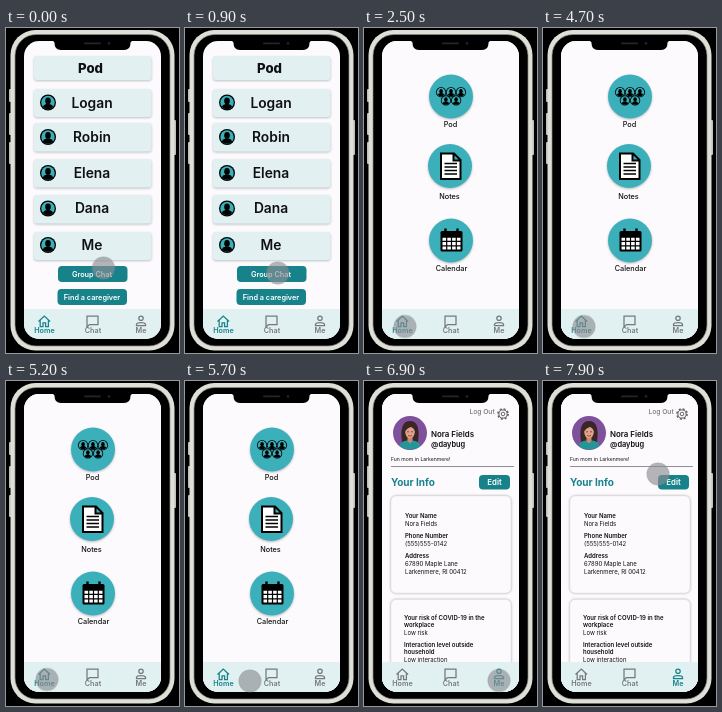
These frames come from a looping animation (173x325 px, 8000 ms). An HTML page:

```html
<!DOCTYPE html>
<html lang="en">
<head>
<meta charset="utf-8">
<title>Care pod app</title>
<style>
  :root { --teal: #17828a; --aqua: #3bb0bb; --pale: #e2f0f2; --paper: #fcfafd; --grey: #75797c; }
  html, body { margin: 0; width: 100%; height: 100%; overflow: hidden; background: #000; }
  svg { display: block; width: 100vw; height: 100vh; }
  text { font-family: Inter, "Open Sans", sans-serif; font-weight: 600; fill: #101012; }
  .mid { text-anchor: middle; }
  .names { font-size: 13.8px; }
  .btn { fill: var(--teal); }
  .on-btn { fill: #fff; font-size: 7.3px; }
  .label { font-size: 7.3px; font-weight: 500; }
  .cards { fill: var(--pale); filter: drop-shadow(0 1.3px .8px #8d9da199); }
  .discs { fill: var(--aqua); filter: drop-shadow(0 1px 1px #5556); }
  .panels { fill: var(--paper); stroke: #e4e2e8; stroke-width: .6; filter: drop-shadow(0 .6px 1.3px #5557); }
  .info { font-size: 6px; }
  .info .v { font-weight: 400; }
  .nav { color: var(--grey); }
  .nav text { font-size: 7.2px; fill: currentColor; }
  .nav path, .nav circle { fill: none; stroke: currentColor; stroke-width: 1.25; }
  .tab-home { animation: leave 8s infinite; }
  .tab-me { animation: enter 8s infinite; }
  #home { animation: show-home 8s infinite; }
  #profile { animation: show-profile 8s infinite; }
  #touch { animation: touch 8s infinite; }

  /* Motion advances in 100 ms ticks. */
  @keyframes show-home {
    0% { opacity: 0; }
    26.25% { opacity: 0; animation-timing-function: steps(2, start); }
    28.75% { opacity: .7; animation-timing-function: steps(3, start); }
    32.5%, 100% { opacity: 1; }
  }
  @keyframes show-profile {
    0% { opacity: 0; }
    82.5% { opacity: 0; animation-timing-function: steps(2, start); }
    85% { opacity: .75; animation-timing-function: steps(2, start); }
    87.5%, 100% { opacity: 1; }
  }
  @keyframes leave {
    0% { color: var(--teal); }
    82.5% { color: var(--teal); animation-timing-function: steps(4, start); }
    87.5%, 100% { color: var(--grey); }
  }
  @keyframes enter {
    0% { color: var(--grey); }
    82.5% { color: var(--grey); animation-timing-function: steps(4, start); }
    87.5%, 100% { color: var(--teal); }
  }
  @keyframes touch {
    0% { transform: translate(97.5px, 240px); }
    11.25% { transform: translate(97.5px, 240px); animation-timing-function: steps(2, start); }
    13.75% { transform: translate(88px, 250px); animation-timing-function: steps(4, start); }
    18.75% { transform: translate(47px, 292px); animation-timing-function: steps(2, start); }
    21.25% { transform: translate(41px, 298.5px); }
    70% { transform: translate(41px, 298.5px); animation-timing-function: steps(2, start); }
    72.5% { transform: translate(65px, 300px); }
    73.75% { transform: translate(65px, 300px); animation-timing-function: steps(6, start); }
    81.25% { transform: translate(135px, 299.5px); }
    93.75% { transform: translate(135px, 299.5px); animation-timing-function: steps(2, start); }
    96.25% { transform: translate(111px, 190px); animation-timing-function: step-start; }
    97.5% { transform: translate(103px, 128px); animation-timing-function: steps(2, start); }
    100% { transform: translate(115px, 93px); }
  }
</style>
</head>
<body>
<svg viewBox="0 0 173 325" preserveAspectRatio="none">
  <defs>
    <clipPath id="glass"><rect x="18" y="13" width="137" height="298" rx="15"/></clipPath>
    <clipPath id="face"><circle r="16.5"/></clipPath>
    <g id="person">
      <circle r="8"/>
      <circle r="6.7" fill="#3bb0bb"/>
      <ellipse cy="-1.6" rx="2.8" ry="3.4"/>
      <path d="M-5.2 4.6Q-4.6 2.2-1.5 1.5H1.5Q4.6 2.2 5.2 4.6Q0 9-5.2 4.6Z"/>
    </g>
  </defs>

  <!-- Phone body -->
  <g fill="#bfc0ba">
    <rect x="3" y="61" width="3" height="13" rx="1"/>
    <rect x="3" y="85" width="3" height="22" rx="1"/>
    <rect x="3" y="114" width="3" height="22" rx="1"/>
    <rect x="167" y="92" width="3" height="35" rx="1"/>
  </g>
  <rect x="4.5" y="2" width="164" height="320.5" rx="25" fill="#dedfd7"/>
  <rect x="9" y="6.5" width="155" height="311.5" rx="21" stroke="#8d8e89" stroke-width=".7"/>

  <g clip-path="url(#glass)">
    <g id="pod">
      <rect x="18" y="13" width="137" height="298" fill="#fcfafd"/>
      <g class="cards">
        <rect x="28" y="28" width="117.5" height="24" rx="3"/>
        <rect x="28" y="61" width="117.5" height="28" rx="3"/>
        <rect x="28" y="95" width="117.5" height="28.5" rx="3"/>
        <rect x="28" y="131" width="117.5" height="28.5" rx="3"/>
        <rect x="28" y="167" width="117.5" height="28.5" rx="3"/>
        <rect x="28" y="204" width="117.5" height="28" rx="3"/>
      </g>
      <use href="#person" x="42" y="74.5"/>
      <use href="#person" x="42" y="109"/>
      <use href="#person" x="42" y="145"/>
      <use href="#person" x="42" y="180.5"/>
      <use href="#person" x="42" y="217"/>
      <g class="mid names">
        <text x="84.5" y="45" style="font-size:13.2px;font-weight:800">Pod</text>
        <text x="86" y="79.5">Logan</text>
        <text x="86" y="113.5">Robin</text>
        <text x="86" y="149.5">Elena</text>
        <text x="86" y="185">Dana</text>
        <text x="86" y="222">Me</text>
      </g>
      <rect class="btn" x="52" y="238" width="69.5" height="16" rx="4"/>
      <rect class="btn" x="51.5" y="261" width="69.5" height="16" rx="4"/>
      <text class="mid on-btn" x="86" y="248.8">Group Chat</text>
      <text class="mid on-btn" x="86" y="271.8">Find a caregiver</text>
    </g>

    <g id="home">
      <rect x="18" y="13" width="137" height="298" fill="#fcfafd"/>
      <g class="discs">
        <circle cx="87" cy="68.5" r="22"/>
        <circle cx="86" cy="138" r="22"/>
        <circle cx="87" cy="212.5" r="22"/>
      </g>
      <g transform="translate(87 68) scale(.64)">
        <use href="#person" x="-15.5" y="-6"/>
        <use href="#person" y="-6"/>
        <use href="#person" x="15.5" y="-6"/>
        <use href="#person" x="-8" y="7"/>
        <use href="#person" x="8" y="7"/>
      </g>
      <path d="M77 125.5H90L96.5 132V151H77Z M89.5 126V132.5H96" fill="#fff" stroke="#000" stroke-width="2"/>
      <path d="M80.5 135.5H93M80.5 139H93M80.5 142.5H93M80.5 146H93" stroke="#000" stroke-width="1.6"/>
      <rect x="76.5" y="203" width="22" height="20.5" rx="1.5"/>
      <path d="M81.5 200.5V206M93.5 200.5V206" stroke="#000" stroke-width="2.4"/>
      <path d="M78.5 211.2H96.5M78.5 215.6H96.5M78.5 220H96.5" stroke="#fff" stroke-width="3.1" stroke-dasharray="3.6 1.2"/>
      <g class="mid">
        <text class="label" x="86.5" y="98.8">Pod</text>
        <text class="label" x="85.5" y="170.8">Notes</text>
        <text class="label" x="87.5" y="242.8">Calendar</text>
      </g>
    </g>

    <g id="profile">
      <rect x="18" y="13" width="137" height="298" fill="#fcfafd"/>
      <g transform="translate(46 52)">
        <circle r="17" fill="#7f519d"/>
        <g clip-path="url(#face)">
          <path d="M-8 9Q-11-12 0-12T8 9Z" fill="#3c2527"/>
          <path d="M-12 18Q-11 8-3 7.5H3Q11 8 12 18Z" fill="#23969a"/>
          <path d="M-2.5 3H2.5V8L0 10.5L-2.5 8Z" fill="#c98a70"/>
          <ellipse cy="-1" rx="4.8" ry="6.2" fill="#dfa488"/>
          <path d="M-5.3-1Q-5-9 1-9Q5.3-8 5.3-1Q4-5 1-6Q-3-5-5.3-1Z" fill="#3c2527"/>
          <path d="M-2 2.4Q0 3.9 2 2.4" fill="none" stroke="#a33e48" stroke-width=".9"/>
          <path d="M-2.7-1.2H-1.3M1.3-1.2H2.7" stroke="#352225" stroke-width=".9"/>
        </g>
      </g>
      <text x="67" y="55.8" font-size="7.9">Nora Fields</text>
      <text x="67" y="66" font-size="7.4">@daybug</text>
      <text x="105.5" y="32.8" style="font-size:6.7px;font-weight:500;fill:#747477">Log Out</text>
      <g transform="translate(139 33)" fill="none" stroke="#66686b">
        <circle r="5" stroke-width="1.8" stroke-dasharray="2 1.927"/>
        <circle r="4.1" stroke-width="1"/>
        <circle r="1.8" stroke-width="1"/>
      </g>
      <text x="27" y="79.8" style="font-size:5.1px;font-weight:400">Fun mom in Larkenmere!</text>
      <path d="M27 85.5H150" stroke="#77777b" stroke-width=".8"/>
      <text x="27" y="105" style="font-size:10px;font-weight:700;fill:var(--teal)">Your Info</text>
      <rect class="btn" x="115" y="94" width="31" height="14.5" rx="4"/>
      <text class="mid" x="130.5" y="104.2" style="font-size:7.8px;fill:#fff">Edit</text>
      <g class="panels">
        <rect x="27" y="115" width="120" height="97" rx="5"/>
        <rect x="27" y="218.5" width="120" height="97" rx="5"/>
      </g>
      <g class="info">
        <text x="41" y="137.2">Your Name</text>
        <text class="v" x="41" y="145.2">Nora Fields</text>
        <text x="41" y="157.3">Phone Number</text>
        <text class="v" x="41" y="165.2">(555)555-0142</text>
        <text x="41" y="177.2">Address</text>
        <text class="v" x="41" y="185.2">67890 Maple Lane</text>
        <text class="v" x="41" y="193">Larkenmere, RI 00412</text>
        <text x="40" y="239.2">Your risk of COVID-19 in the</text>
        <text x="40" y="246.4">workplace</text>
        <text class="v" x="40" y="254.2">Low risk</text>
        <text x="40" y="266.2">Interaction level outside</text>
        <text x="40" y="273.3">household</text>
        <text class="v" x="40" y="281">Low interaction</text>
      </g>
    </g>

    <g class="nav mid">
      <rect x="18" y="281" width="137" height="30" fill="#e1f1f2"/>
      <g class="tab-home">
        <path d="M32.5 293.5L38.3 288L44.1 293.5M34.2 292.5V298.6H37V294.8H39.6V298.6H42.4V292.5"/>
        <text x="38.5" y="305.3">Home</text>
      </g>
      <path d="M81 288H92V296.5H83.5L81 299Z"/>
      <text x="87" y="305.3">Chat</text>
      <g class="tab-me">
        <circle cx="135" cy="290.3" r="2.2"/>
        <path d="M130.5 297.6V296.2Q131 294.5 135 294.5T139.500 296.2V297.6Z"/>
        <text x="135" y="305.3">Me</text>
      </g>
    </g>
  </g>

  <path d="M45 12.500Q48.500 13 48.500 15Q48.500 22 55 22H118Q124.500 22 124.500 15Q124.500 13 128 12.500Z"/>
  <rect x="78" y="14.500" width="17" height="1.800" rx=".9" fill="#242529"/>
  <circle cx="103" cy="15.400" r="1.400" fill="#1b2233"/>

  <g id="touch">
    <circle r="11.300" fill="#8c8d91" fill-opacity=".64" stroke="#808186" stroke-opacity=".3" stroke-width=".7"/>
  </g>
</svg>
</body>
</html>
```
